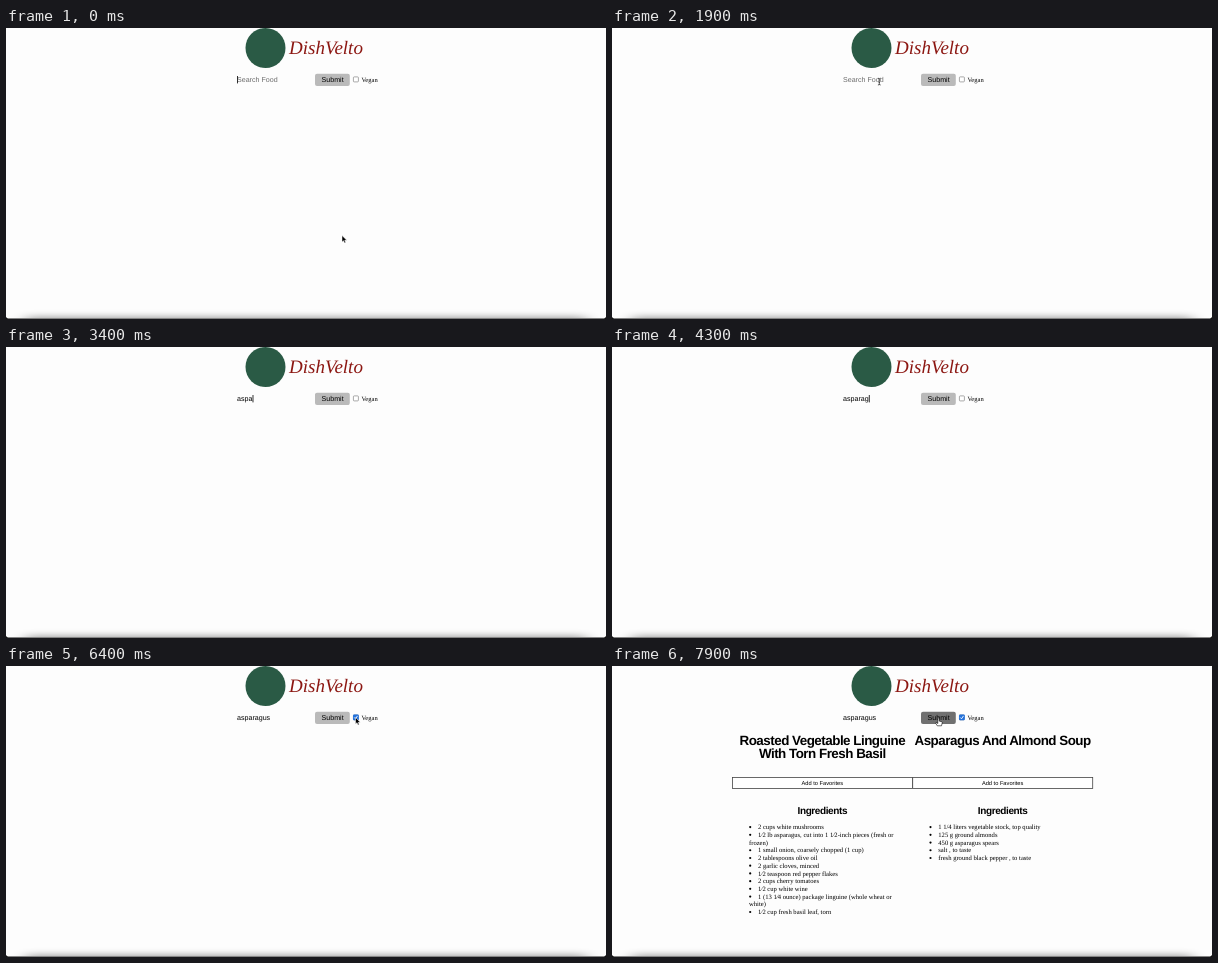
Recreate the animation shown at these times as an HTML page. Size 600 px wide and 291 px high, loop 8 s.

```html
<!DOCTYPE html>
<html lang="en">
<head>
<meta charset="utf-8">
<title>Recipe search</title>
<style>
  html, body { margin: 0; width: 100%; height: 100%; overflow: hidden; background: #fdfdfd; }
  svg { display: block; width: 100vw; height: 100vh; }
  text { font-family: "Liberation Sans", Arial, sans-serif; text-rendering: geometricPrecision; }
  .serif { font-family: "Liberation Serif", Times, serif; }
  .brand { font-size: 19px; font-style: italic; fill: #8c1712; }
  .field { font-size: 7.1px; }
  .mid { text-anchor: middle; }
  .title { font-size: 13.4px; font-weight: bold; letter-spacing: -.5px; }
  .sub { font-size: 10px; font-weight: bold; letter-spacing: -.4px; }
  .fav { font-size: 5.7px; }
  .item { font-size: 6.6px; }
</style>
</head>
<body>
<svg viewBox="0 0 600 291" preserveAspectRatio="none">
  <defs>
    <filter id="soft" x="-10%" y="-400%" width="120%" height="900%">
      <feGaussianBlur stdDeviation="8 3.6"/>
    </filter>
  </defs>
  <rect width="600" height="291" fill="#fdfdfd"/>
  <rect x="20" y="289" width="560" height="12" fill="#000" opacity=".38" filter="url(#soft)"/>
  <rect y="290" width="600" height="1" fill="#858585"/>
  <path d="M0 289v2h2zM600 289v2h-2z" fill="#111"/>

  <circle cx="259.5" cy="20" r="20" fill="#2a5a45"/>
  <text class="serif brand" x="283" y="25.6">DishVelto</text>

  <text class="field" id="query" x="231" y="54.2"></text>
  <rect id="caret" y="48" width=".8" height="7.4"/>
  <rect id="button" x="309" y="45.7" width="34.8" height="12.2" rx="2"/>
  <text class="field mid" x="326.6" y="54.3">Submit</text>
  <rect x="347.4" y="48.9" width="5" height="5" rx=".8" fill="#fff" stroke="#858585" stroke-width=".7"/>
  <g id="check">
    <rect x="347" y="48.5" width="5.8" height="5.8" rx="1" fill="#2372dc"/>
    <path d="M348.3 51.5l1.2 1.3 2-2.9" fill="none" stroke="#fff" stroke-width=".9"/>
  </g>
  <text class="serif" x="355.4" y="54.2" font-size="6.5">Vegan</text>

  <g id="results"></g>

  <g id="pointer">
    <path id="arrow" d="M0 0v6.6l1.5-1.4 1 2.4 1.2-.5-1-2.3h2.1z" fill="#000" stroke="#fff" stroke-width=".5"/>
    <path id="beam" d="M-1.4-3.3Q0-3.3 0-2.3Q0-3.3 1.4-3.3M0-2.3V2.7M-1.4 3.5Q0 3.5 0 2.5Q0 3.5 1.4 3.5M-.7.9H.7" fill="none" stroke="#222" stroke-width=".7"/>
    <path id="hand" d="M-.7 0Q0-.9.7 0V2.6L3.2 3.2Q3.9 3.5 3.7 4.5L3 7.3H-1.2L-3 4.5Q-2.6 3.4-1.6 4.3L-.7 5z" fill="#fff" stroke="#000" stroke-width=".6"/>
  </g>
</svg>
<script>
const LOOP = 8000, CHECKED = 6400, FOUND = 7500;
const WORD = "asparagus";
const KEYS = [2600, 2850, 3100, 3300, 3700, 3950, 4200, 4600, 4800];
// time, x, y of the pointer tip
const PATH = [
  [100, 336, 207.5], [850, 267.3, 53.5], [4950, 267.3, 53.5], [5150, 300, 61],
  [5400, 336, 60], [5700, 336, 60], [6150, 349.5, 51.5], [6650, 349.5, 51.5],
  [7000, 326.5, 52.5], [LOOP, 326.5, 52.5]
];
const $ = id => document.getElementById(id);
const show = (id, on) => $(id).setAttribute("visibility", on ? "visible" : "hidden");

const recipes = [
  {
    x: 120, title: ["Roasted Vegetable Linguine", "With Torn Fresh Basil"],
    items: ["2 cups white mushrooms",
      "1⁄2 lb asparagus, cut into 1 1⁄2-inch pieces (fresh or|frozen)",
      "1 small onion, coarsely chopped (1 cup)", "2 tablespoons olive oil",
      "2 garlic cloves, minced", "1⁄2 teaspoon red pepper flakes",
      "2 cups cherry tomatoes", "1⁄2 cup white wine",
      "1 (13 1⁄4 ounce) package linguine (whole wheat or|white)",
      "1⁄2 cup fresh basil leaf, torn"]
  },
  {
    x: 300.3, title: ["Asparagus And Almond Soup"],
    items: ["1 1/4 liters vegetable stock, top quality", "125 g ground almonds",
      "450 g asparagus spears", "salt , to taste", "fresh ground black pepper , to taste"]
  }
];

const label = (cls, x, y, s) => `<text class="${cls}" x="${x}" y="${y}">${s}</text>`;

function card({ x, title, items }) {
  const mid = x + 90.3;
  let out = title.map((s, i) => label("title mid", mid, 79.2 + i * 13.2, s)).join("");
  out += `<rect x="${x + .4}" y="111.5" width="180" height="11" fill="#fff" stroke="#444" stroke-width=".8"/>`;
  out += label("fav mid", mid, 119, "Add to Favorites") + label("sub mid", mid, 147.6, "Ingredients");
  let y = 163.2;
  for (const item of items) {
    item.split("|").forEach((s, i) => {
      if (!i) out += `<circle cx="${x + 18.2}" cy="${y - 2.1}" r="1.1"/>`;
      out += label("serif item", x + (i ? 17 : 26), y, s);
      y += 7.72;
    });
  }
  return out;
}
$("results").innerHTML = recipes.map(card).join("");

function pointerAt(t) {
  if (t <= PATH[0][0]) return PATH[0].slice(1);
  const i = PATH.findIndex(p => p[0] > t);
  const [t0, x0, y0] = PATH[i - 1], [t1, x1, y1] = PATH[i];
  const p = (t - t0) / (t1 - t0), e = p * p * (3 - 2 * p);
  return [x0 + (x1 - x0) * e, y0 + (y1 - y0) * e];
}

function draw(t) {
  const typed = KEYS.filter(k => k <= t).length;
  const query = $("query");
  query.textContent = typed ? WORD.slice(0, typed) : "Search Food";
  query.setAttribute("fill", typed ? "#000" : "#6c6c6c");

  const since = t - (typed ? KEYS[typed - 1] : 0);
  $("caret").setAttribute("x", 231.2 + (typed ? query.getComputedTextLength() : 0));
  show("caret", t < CHECKED && since % 1000 < 500);

  const [x, y] = pointerAt(t);
  const inRow = y > 46 && y < 58;
  const overField = inRow && x > 229 && x < 306;
  const overButton = inRow && x > 309 && x < 344;
  const visible = t < KEYS[0] || t >= 4950;
  $("pointer").setAttribute("transform", `translate(${x} ${y})`);
  show("beam", visible && overField);
  show("hand", visible && overButton);
  show("arrow", visible && !overField && !overButton);
  $("button").setAttribute("fill", overButton ? "#707070" : "#bababa");

  show("check", t >= CHECKED);
  show("results", t >= FOUND);
}

function frame() {
  draw(performance.now() % LOOP);
  requestAnimationFrame(frame);
}
frame();
</script>
</body>
</html>
```
